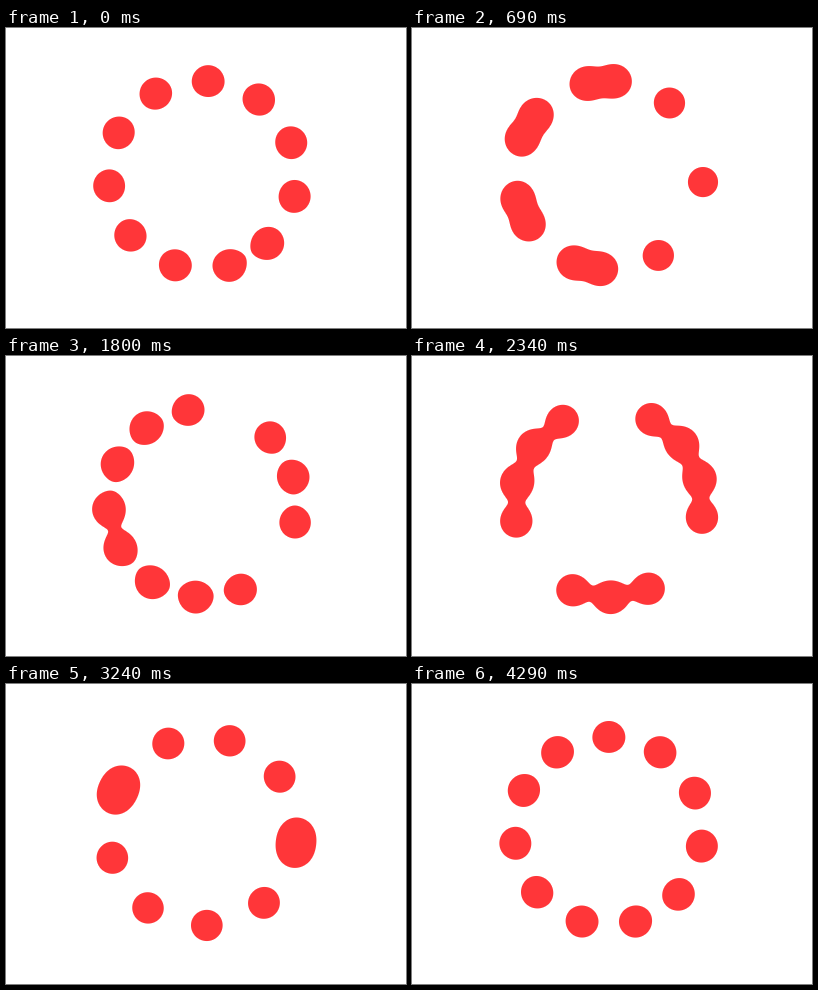
These frames come from a looping animation (400 px wide and 300 px high, 4.32 s). An HTML page with a canvas:

```html
<!DOCTYPE html>
<html lang="en">
<head>
<meta charset="utf-8">
<title>Metaball ring</title>
<style>
  html, body { margin: 0; width: 100%; height: 100%; overflow: hidden; background: #fff; }
  canvas { display: block; }
</style>
</head>
<body>
<canvas id="stage" width="400" height="300"></canvas>
<script>
const W = 400, H = 300, LOOP = 4320;
const COUNT = 11, CX = 196.8, CY = 147.2, RING = 94.6;
const OFFSET = 40.5;   // degrees
const STRENGTH = 200;  // squared radius of a lone ball
const COLOR = [255, 54, 57];
const TURN = 360 / COUNT * 5; // growth of the step angle in one loop

// [time in ms, angle between consecutive balls in degrees]
const keys = [
  [0, 33.24], [690, 53.9], [1200, 82.5], [1800, 110.5], [2190, 123],
  [2820, 144.95], [3240, 160.97], [3780, 184.3], [4290, 196.5]
];

// Key k, continued periodically on both sides.
function keyAt(k) {
  const lap = Math.floor(k / keys.length);
  const [t, s] = keys[k - lap * keys.length];
  return [t + lap * LOOP, s + lap * TURN];
}

function slope(k) {
  const [t0, s0] = keyAt(k - 1), [t1, s1] = keyAt(k), [t2, s2] = keyAt(k + 1);
  const a = t1 - t0, b = t2 - t1;
  return (b * (s1 - s0) / a + a * (s2 - s1) / b) / (a + b);
}

// Smooth cubic through the keys.
function stepAngle(t) {
  let k = keys.length - 1;
  while (keys[k][0] > t) k--;
  const [t0, s0] = keyAt(k), [t1, s1] = keyAt(k + 1);
  const h = t1 - t0, u = (t - t0) / h, v = 1 - u;
  return s0 * v * v * (1 + 2 * u) + s1 * u * u * (1 + 2 * v)
    + h * u * v * (slope(k) * v - slope(k + 1) * u);
}

const ctx = document.getElementById("stage").getContext("2d");
const image = ctx.createImageData(W, H);
const px = new Float64Array(COUNT), py = new Float64Array(COUNT);

function draw(t) {
  const step = stepAngle(t);
  for (let i = 0; i < COUNT; i++) {
    const a = (OFFSET + (i + 1) * step) * Math.PI / 180;
    px[i] = CX + RING * Math.cos(a);
    py[i] = CY + RING * Math.sin(a);
  }
  for (let y = 0, p = 0; y < H; y++) {
    for (let x = 0; x < W; x++, p += 4) {
      let field = 0, gx = 0, gy = 0;
      for (let i = 0; i < COUNT; i++) {
        const dx = x + 0.5 - px[i], dy = y + 0.5 - py[i];
        const q = 1 / (dx * dx + dy * dy + 1e-6), f = STRENGTH * q;
        field += f;
        gx += 2 * f * q * dx;
        gy += 2 * f * q * dy;
      }
      // Distance to the contour gives the soft edge.
      const edge = (field - 1) / (Math.hypot(gx, gy) + 1e-9);
      const cover = field > 2 ? 1 : Math.min(1, Math.max(0, edge + 0.5));
      for (let c = 0; c < 3; c++) image.data[p + c] = 255 + (COLOR[c] - 255) * cover;
      image.data[p + 3] = 255;
    }
  }
  ctx.putImageData(image, 0, 0);
}

const start = performance.now();
function tick() {
  draw((performance.now() - start) % LOOP);
  requestAnimationFrame(tick);
}
tick();
</script>
</body>
</html>
```
